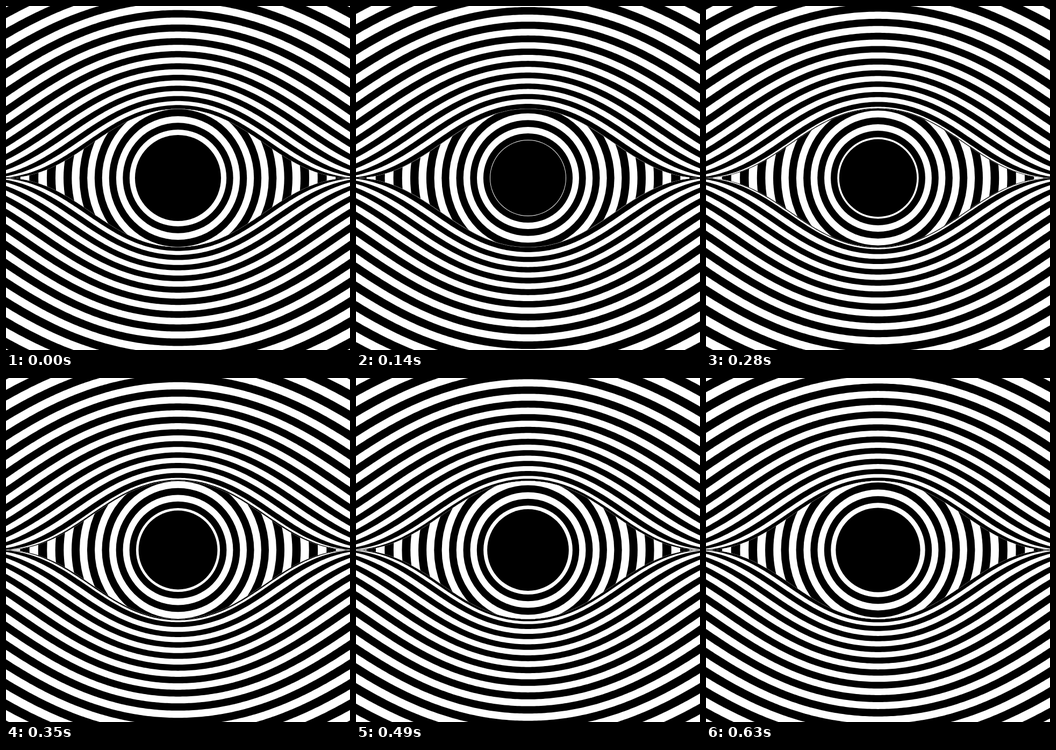
Recreate the animation shown at these times as an HTML page with a canvas. Size 640x640 px, loop 700 ms.

```html
<!DOCTYPE html>
<html lang="en">
<head>
<meta charset="utf-8">
<title>Striped eye</title>
<style>
  html, body { margin: 0; width: 100%; height: 100%; overflow: hidden; background: #000; }
  canvas { display: block; width: 640px; height: 640px; }
</style>
</head>
<body>
<canvas id="eye" width="640" height="640"></canvas>
<script>
const ctx = document.getElementById('eye').getContext('2d');
const HALF = 320, STEP = 70, STEPS = 10;
const LID = 129;

// Sizes grow geometrically with a band's age, counted in loops.
const irisSize = age => 71 + 480 * (1.05 ** age - 1);
const lidSize = age => LID + 307 * (1.058 ** age - 1);

// White bands start as a hairline and reach about half a period.
function bandWidth(age) {
  const a = Math.min(age, 1);
  return 0.04 + 0.56 * a - 0.11 * a * a;
}

function lidHeight(x, size) {
  const angle = Math.min(Math.PI, Math.PI * Math.abs(x) / (2.5 * size));
  return size * (1 + Math.cos(angle - 0.045 * Math.sin(2 * angle))) / 2;
}

function traceLid(size) {
  ctx.beginPath();
  for (let x = -HALF; x <= HALF; x += 4) ctx.lineTo(x, -lidHeight(x, size));
  for (let x = HALF; x >= -HALF; x -= 4) ctx.lineTo(x, lidHeight(x, size));
  ctx.closePath();
}

function traceCircle(radius) {
  ctx.beginPath();
  ctx.arc(0, 0, radius, 0, 2 * Math.PI);
}

function fillBands(trace, sizeAt, count, phase) {
  for (let k = count; k >= 0; k--) {
    const age = k + phase;
    trace(sizeAt(age));
    ctx.fillStyle = '#fff';
    ctx.fill();
    trace(sizeAt(age - bandWidth(age)));
    ctx.fillStyle = '#000';
    ctx.fill();
  }
}

function draw(phase) {
  ctx.setTransform(1, 0, 0, 1, HALF, HALF);
  ctx.fillStyle = '#000';
  ctx.fillRect(-HALF, -HALF, 2 * HALF, 2 * HALF);
  fillBands(traceLid, lidSize, 14, phase);
  ctx.save();
  traceLid(LID - 0.5);
  ctx.clip();
  fillBands(traceCircle, irisSize, 10, phase);
  ctx.restore();
}

let shown = -1;
function tick() {
  const step = Math.floor(performance.now() / STEP) % STEPS;
  if (step !== shown) {
    shown = step;
    draw((step + 8) % STEPS / STEPS);
  }
  requestAnimationFrame(tick);
}
tick();
</script>
</body>
</html>
```
